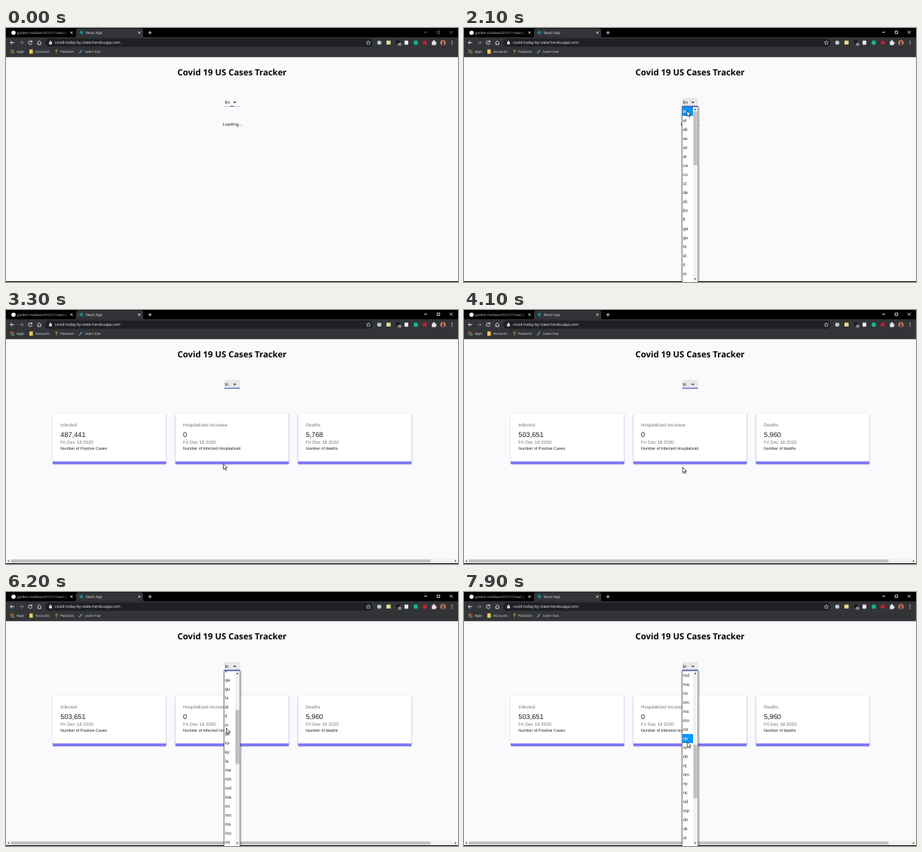
Animation of 600x338 px, one loop 8000 ms. Source, as an HTML page:

```html
<!DOCTYPE html>
<html lang="en">
<head>
<meta charset="utf-8">
<title>Cases tracker</title>
<style>
html, body { margin: 0; width: 100%; height: 100%; overflow: hidden; background: #faf9fc; }
svg { display: block; width: 600px; height: 338px; }
text { text-rendering: geometricPrecision; white-space: pre; }
.ui { font-family: "Open Sans", sans-serif; }
.body { font-family: "Liberation Sans", Arial, sans-serif; }
.line { fill: none; stroke: #e4e5e8; stroke-width: .9; }
</style>
</head>
<body>
<svg id="stage" viewBox="0 0 600 338" xmlns="http://www.w3.org/2000/svg">
  <defs>
    <clipPath id="view"><rect x="290" y="105" width="14" height="232"/></clipPath>
    <linearGradient id="fade">
      <stop offset="0" stop-color="#000" stop-opacity="0"/>
      <stop offset="1" stop-color="#000"/>
    </linearGradient>
    <filter id="soft" x="-20%" y="-20%" width="140%" height="140%"><feGaussianBlur stdDeviation="1"/></filter>
  </defs>
  <rect width="600" height="338" fill="#faf9fc"/>
  <g id="browser"></g>
  <text class="ui" x="300" y="62.6" text-anchor="middle" font-size="11.35" font-weight="700" fill="#050505">Covid 19 US Cases Tracker</text>
  <text id="loading" class="ui" x="287.7" y="130.3" font-size="5.7" fill="#111">Loading...</text>
  <g id="cards"></g>
  <rect y="337" width="600" height="1" fill="#050505"/>
  <g id="select">
    <rect id="field" x="289.8" y="93" width="20.7" height="11.3" rx="1" fill="#e8e7ea"/>
    <text id="label" class="body" x="290.4" y="101" font-size="6.2" fill="#333"></text>
    <path d="M301.4 98h4.6l-2.3 2.4z" fill="#555"/>
    <rect x="289.8" y="104" width="20.7" height=".4" fill="#888"/>
    <rect id="underline" y="103.6" height="1" fill="#3f51b5"/>
  </g>
  <g id="list">
    <rect x="289" y="105" width="23" height="236" fill="#000" opacity=".35" filter="url(#soft)"/>
    <rect x="289.6" y="104.8" width="21" height="234" fill="#fff" stroke="#666" stroke-width=".7"/>
    <g clip-path="url(#view)"><g id="rows" class="body" font-size="6.2"></g></g>
    <rect x="304" y="105.2" width="6.2" height="232" fill="#f1f1f1"/>
    <rect id="thumb" x="304.5" width="5.2" height="71.5" fill="#c1c1c1"/>
    <path d="M305.4 109.2h3.2l-1.6-1.9zM305.4 333.2h3.2l-1.6 1.9z" fill="#444"/>
    <path d="M289.5 104.6h21.2" stroke="#3f51b5" stroke-width="1"/>
  </g>
  <g id="cursor">
    <path id="arrow" d="M0 0V7.4L1.7 5.9 2.9 8.6 4.1 8.1 2.9 5.4H5.2Z" fill="#fff" stroke="#111" stroke-width=".7"/>
    <path id="hand" d="M-.8 .6Q0-.6.8 .6V3.2Q3 2.7 4.2 4V6.3L3.2 8.6H-.7L-2.8 5.4Q-2.6 4.2-.8 5.3Z" fill="#fff" stroke="#111" stroke-width=".7"/>
  </g>
</svg>
<script>
const LOOP = 8000, STEP = 100, ROW = 12, TOP = 105;
const $ = id => document.getElementById(id);
const show = (id, on) => $(id).setAttribute('visibility', on ? 'inherit' : 'hidden');
const set = (id, attrs) => { for (const k in attrs) $(id).setAttribute(k, attrs[k]); };

const text = (x, y, size, fill, str, font = 'ui') =>
  `<text class="${font}" x="${x}" y="${y}" font-size="${size}" fill="${fill}">${str}</text>`;
const rect = (x, y, w, h, fill, rx = 0) =>
  `<rect x="${x}" y="${y}" width="${w}" height="${h}" rx="${rx}" fill="${fill}"/>`;
const dot = (x, y, r, fill) => `<circle cx="${x}" cy="${y}" r="${r}" fill="${fill}"/>`;
const line = (d, extra = '') => `<path class="line" d="${d}" ${extra}/>`;
const cross = (x, y, r) => line(`M${x - r} ${y - r}l${2 * r} ${2 * r}m0 ${-2 * r}l${-2 * r} ${2 * r}`);

function drawBrowser() {
  const pale = '#e4e5e8';
  let s = rect(0, 0, 600, 13, '#000') + rect(0, 12.3, 600, 26.5, '#333437');
  s += `<path d="M91 12.5q2 0 2-2.2V3q0-2.6 2.6-2.6h83.8q2.6 0 2.6 2.6v7.3q0 2.2 2 2.2z" fill="#333437"/>`;
  // tabs
  s += dot(10, 6.2, 2.8, '#f2f2f2');
  s += text(15, 8, 4.45, '#c6c7ca', 'garden-mallows/201217-react-p');
  s += rect(74, 1, 9, 10, 'url(#fade)') + cross(87, 6.2, 1.5);
  s += dot(100, 6.2, 2.4, '#1f7f86') + text(106, 8, 4.6, pale, 'React App') + cross(177, 6.2, 1.5);
  s += line('M188.8 6.2h4.6M191.1 3.9v4.6');
  s += `<g id="controls">${line('M555 5.6h4')}${line('M572.3 4h3.4v3.4h-3.4z')}${cross(591, 5.6, 1.9)}</g>`;
  // toolbar
  s += line('M11 19.5H5.8M8.2 17l-2.5 2.5 2.5 2.5');
  s += line('M17.6 19.5h5.2M20.4 17l2.5 2.5-2.5 2.5', 'opacity=".4"');
  s += line('M34 17.9a2.4 2.4 0 1 0 .5 2.1M34.4 16.6v1.9h-1.9');
  s += line('M41.6 19.6l2.6-2.5 2.6 2.5M42.3 19.4v2.6h3.8v-2.6');
  s += rect(52, 14.1, 434.5, 10.9, '#1f2023', 5.4);
  s += rect(57.3, 18.8, 3.6, 3, pale, .4) + line('M58 19v-1q1.1-1.8 2.2 0v1', 'stroke-width=".6"');
  s += text(65, 21.4, 5.1, '#f2f2f3', 'covid-today-by-state.herokuapp.com');
  s += line('M481 16.8l.8 1.8 2 .2-1.5 1.3.4 1.9-1.7-1-1.7 1 .4-1.9-1.5-1.3 2-.2z', 'style="stroke-width:.6"');
  s += dot(495.5, 19.5, 2.8, '#b9c6d2') + rect(505, 16.8, 5.6, 5.2, '#e2d78b', .6);
  s += rect(518, 16.5, 4.4, 4.4, '#171819', .5) + rect(520.4, 19.8, 4.2, 3.8, '#8b8d90', .6);
  s += rect(529, 16.8, 5, 5.4, '#e9e9e9', .8) + dot(544, 19.5, 2.9, '#12b886') + dot(556, 19.5, 2.7, '#c21f32');
  s += `<path d="M565.3 17.8h1.4q0-1.7 1.3-1.7t1.3 1.7h1.2v1.4q1.3 0 1.3 1t-1.3 1.1v1.4h-5.2z" fill="${pale}"/>`;
  s += dot(580, 19.5, 3.6, '#c77e63') + dot(580, 18.5, 1.3, '#432b29') + rect(578.2, 20.2, 3.6, 2.2, '#432b29', 1);
  s += [17.4, 19.5, 21.6].map(y => dot(592, y, .65, pale)).join('');
  // bookmarks
  const tints = ['#e25241', '#e8b33d', '#4f9d5c', '#4c85db'];
  for (let i = 0; i < 9; i++)
    s += rect(5.8 + i % 3 * 1.9, 28.8 + Math.floor(i / 3) * 1.9, 1.3, 1.3, tints[(i * 3 + 1) % 4]);
  s += text(14, 33.2, 4.5, pale, 'Apps');
  s += rect(31, 28.4, 4.6, 5.8, '#f1c75b', .5) + text(39, 33.2, 4.4, pale, 'Accounts');
  s += line('M67 28.2v6M65 30.2h4', 'style="stroke:#b08b45"') + text(72, 33.2, 4.4, pale, 'Podcasts');
  s += line('M97.2 33.8l3.8-4.7', 'style="stroke:#4fa3dc;stroke-width:1.3"') + text(105, 33.2, 4.4, pale, 'Learn Vue');
  $('browser').innerHTML = s;
}

function drawCards() {
  const info = [
    ['Infected', 'Number of Positive Cases'],
    ['Hospitalized Increase', 'Number of Infected Hospitalized'],
    ['Deaths', 'Number of deaths']
  ];
  let s = '';
  info.forEach(([head, note], i) => {
    const x = 62 + i * 162.8, tx = x + 10.3;
    s += `<rect x="${x}" y="138.6" width="150.7" height="67" rx="1.5" fill="#000" opacity=".16" filter="url(#soft)"/>`;
    s += rect(x, 138, 150.7, 67.3, '#7b75f5', 1.4) + rect(x, 138, 150.7, 63.6, '#fff', 1);
    s += text(tx, 155, 6.15, '#777', head, 'body');
    s += `<text id="num${i}" class="body" x="${tx}" y="168.6" font-size="9.2" fill="#1c1c1c"></text>`;
    s += text(tx, 177.7, 6.15, '#777', 'Fri Dec 18 2020', 'body');
    s += text(tx, 186, 5.37, '#222', note, 'body');
  });
  s += rect(0, 331.3, 600, 5.8, '#f1f1f1') + rect(6.5, 332, 557, 4.2, '#c1c1c1');
  s += '<path d="M4 332.5v3.2l-1.9-1.6zM596 332.5v3.2l1.9-1.6z" fill="#555"/>';
  $('cards').innerHTML = s;
}

const states = ('tn al ak as az ar ca co ct de dc fm fl ga gu hi id il in ia ks ky la me mh md ma mi mn ms mo mt ' +
  'ne nv nh nj nm ny nc nd mp oh ok or pw pa pr ri sc sd tn tx ut vt vi va wa wv wi wy').split(' ');

function drawRows() {
  $('rows').innerHTML = '<rect id="hover" x="290" width="14" height="12" fill="#0d96fb"/>' +
    states.map((name, i) => `<text x="290.4" y="${TOP + 8.2 + i * ROW}">${name}</text>`).join('');
}

// keys: [time, value, ...]
const path = [
  [200, 303, 186], [800, 301, 101], [1700, 299, 99], [2000, 296, 110], [2400, 296, 110],
  [3100, 288.5, 204.5], [3300, 288.5, 204.5], [3700, 290, 222], [4000, 290, 218], [4600, 293, 99],
  [5000, 293, 99], [5500, 292.5, 181], [7500, 292.5, 181], [7900, 296.3, 199.5]
];
const wheel = [[5600, 0], [5900, 62], [6200, 150], [6600, 228], [7000, 279], [7500, 300]];

function track(keys, t, ease) {
  if (t <= keys[0][0]) return keys[0].slice(1);
  const n = keys.findIndex(k => k[0] >= t);
  if (n < 0) return keys[keys.length - 1].slice(1);
  const a = keys[n - 1], b = keys[n];
  let p = (t - a[0]) / (b[0] - a[0]);
  if (ease) p = p * p * (3 - 2 * p);
  return a.slice(1).map((v, i) => v + (b[i + 1] - v) * p);
}

function render(t) {
  const [x, y] = track(path, t, true);
  const [scroll] = track(wheel, t, false);
  const open = (t >= 1200 && t < 2400) || t >= 4700;
  const focused = t >= 1200, loaded = t >= 2700;

  show('loading', t < 2500);
  show('cards', loaded);
  show('list', open);
  show('field', focused);
  $('controls').setAttribute('opacity', focused ? 1 : .45);
  $('label').textContent = t < 2400 ? 'fm' : 'tn';
  const nums = t < 3700 ? ['487,441', '0', '5,768'] : ['503,651', '0', '5,960'];
  nums.forEach((n, i) => { $('num' + i).textContent = n; });

  const grow = focused ? Math.min(1, .3 + (t - 1200) / 200) : Math.max(0, .25 - t / 400);
  set('underline', { x: 300.15 - 10.35 * grow, width: 20.7 * grow });

  const wheeling = t > 5600 && t < 7600;
  const over = y > TOP ? Math.floor((y - TOP + scroll) / ROW) : 0;
  show('hover', open && !wheeling);
  set('hover', { y: TOP + over * ROW });
  set('rows', { transform: `translate(0 ${-scroll})` });
  states.forEach((_, i) => {
    $('rows').children[i + 1].setAttribute('fill', i === over && !wheeling ? '#fff' : '#333');
  });
  set('thumb', { y: 111 + scroll * .307 });

  const pointing = y < 104 && y > 93;
  show('cursor', t >= 200);
  show('arrow', !pointing);
  show('hand', pointing);
  set('cursor', { transform: `translate(${x} ${y})` });
}

drawBrowser();
drawCards();
drawRows();
const start = performance.now();
function tick() {
  const t = (performance.now() - start) % LOOP;
  render(Math.floor(t / STEP) * STEP);
  requestAnimationFrame(tick);
}
tick();
</script>
</body>
</html>
```
